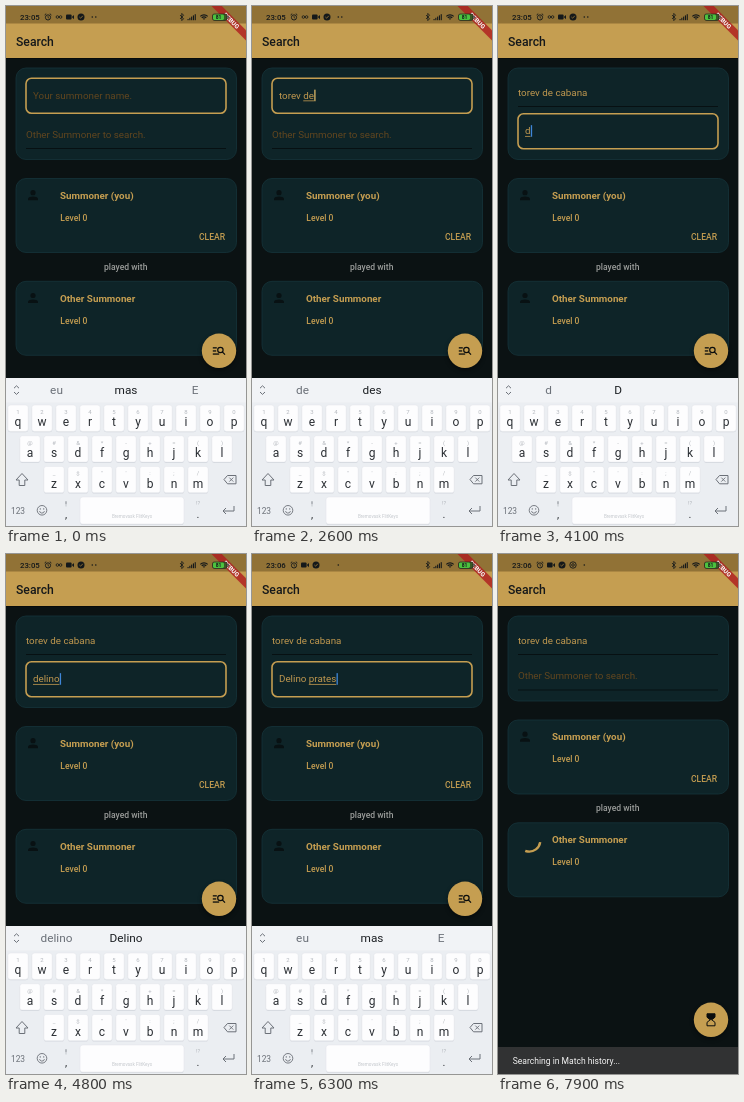
An HTML page with a canvas that plays this animation: 240 px wide and 520 px high, repeating every 8 s.

```html
<!DOCTYPE html>
<html lang="en">
<head>
<meta charset="utf-8">
<title>Summoner search</title>
<style>
html, body { margin: 0; width: 240px; height: 520px; overflow: hidden; background: #0b1213; }
canvas { display: block; width: 240px; height: 520px; }
</style>
</head>
<body>
<canvas id="stage"></canvas>
<script>
const LOOP = 8000, W = 240, H = 520;
const GOLD = '#c59e51', INK = '#14181a', CARD = '#0e2428';
const canvas = document.getElementById('stage');
const g = canvas.getContext('2d');
const dpr = window.devicePixelRatio || 1;
canvas.width = W * dpr;
canvas.height = H * dpr;

const clamp = v => Math.max(0, Math.min(1, v));
const ramp = (t, a, b) => clamp((t - a) / (b - a));
const mix = (a, b, k) => a + (b - a) * k;
const ease = x => x * x * (3 - 2 * x);
const typed = (s, t, from, step) => s.slice(0, Math.max(0, Math.floor((t - from) / step)));

// cubic-bezier(.4, 0, .2, 1), solved by bisection
function fastOutSlowIn(x) {
  let lo = 0, hi = 1, s = 0.5;
  for (let i = 0; i < 18; i++) {
    s = (lo + hi) / 2;
    const v = 1.2 * s * (1 - s) * (1 - s) + 0.6 * s * s * (1 - s) + s * s * s;
    if (v < x) lo = s; else hi = s;
  }
  return 3 * s * s * (1 - s) + s * s * s;
}

function text(s, x, y, size, color, weight = 400, align = 'left') {
  g.font = `${weight} ${size}px Roboto, sans-serif`;
  g.textAlign = align;
  g.textBaseline = 'alphabetic';
  g.fillStyle = color;
  g.fillText(s, x, y + size * 0.355);
  return g.measureText(s).width;
}

function rect(x, y, w, h, color) {
  g.fillStyle = color;
  g.fillRect(x, y, w, h);
}

function box(x, y, w, h, r, fill, stroke, lw = 1) {
  g.beginPath();
  g.roundRect(x, y, w, h, r);
  if (fill) { g.fillStyle = fill; g.fill(); }
  if (stroke) { g.strokeStyle = stroke; g.lineWidth = lw; g.stroke(); }
}

function disc(x, y, r, color) {
  g.beginPath();
  g.arc(x, y, r, 0, 7);
  g.fillStyle = color;
  g.fill();
}

function ring(x, y, r, color, lw) {
  g.beginPath();
  g.arc(x, y, r, 0, 7);
  g.strokeStyle = color;
  g.lineWidth = lw;
  g.stroke();
}

// points: x, y pairs
function line(points, color, lw, fill, close) {
  g.beginPath();
  for (let i = 0; i < points.length; i += 2) g.lineTo(points[i], points[i + 1]);
  if (close) g.closePath();
  if (fill) { g.fillStyle = fill; g.fill(); }
  if (color) { g.strokeStyle = color; g.lineWidth = lw; g.stroke(); }
}

function alarm(x) {
  ring(x, 11.4, 2.6, INK, 0.9);
  line([x, 9.8, x, 11.6, x + 1.2, 12.2], INK, 0.7);
  line([x - 3.4, 9, x - 1.8, 7.7], INK, 0.9);
  line([x + 3.4, 9, x + 1.8, 7.7], INK, 0.9);
}

function glasses(x) {
  ring(x - 1.6, 11, 1.3, INK, 0.8);
  ring(x + 1.6, 11, 1.3, INK, 0.8);
}

function camera(x) {
  box(x - 4, 8.6, 5.6, 5, 1, INK);
  line([x + 1.8, 11, x + 4, 9, x + 4, 13.2], null, 0, INK, true);
}

function tick(x) {
  disc(x, 11, 3.5, INK);
  line([x - 1.6, 11, x - 0.4, 12.2, x + 1.8, 9.8], '#917236', 0.9);
}

function statusBar(t) {
  const late = t >= 5500;
  text(late ? '23:06' : '23:05', 14, 11.2, 7.8, INK, 500);
  alarm(42);
  if (late) {
    camera(53);
    tick(64);
    if (t >= 6650) {
      ring(75, 11, 3.2, INK, 0.9);
      ring(75, 11, 1.3, INK, 0.9);
    }
    disc(86.3, 11, 0.8, INK);
  } else {
    glasses(53);
    camera(64);
    tick(75);
    disc(86.3, 11, 0.8, INK);
    disc(89.8, 11, 0.8, INK);
  }
  line([174, 9, 177.6, 12.8, 175.8, 14.6, 175.8, 7.4, 177.6, 9.2, 174, 13], INK, 0.8);
  for (let i = 0; i < 5; i++) rect(181.5 + i * 1.8, 13 - i * 1.2, 1.1, 1.2 + i * 1.2, INK);
  g.lineCap = 'butt';
  for (let i = 0; i < 3; i++) {
    g.beginPath();
    g.arc(198, 14, 1.2 + i * 2, -Math.PI * 0.75, -Math.PI * 0.25);
    g.strokeStyle = INK;
    g.lineWidth = 1.2;
    g.stroke();
  }
  box(206.5, 8, 14.5, 6.4, 1.8, '#3a5a25', INK, 0.6);
  box(207, 8.5, 11, 5.4, 1.4, '#4cc23f');
  text('81', 212.5, 11.3, 5, INK, 700, 'center');
  rect(221.6, 10, 1, 2.4, INK);
}

function banner() {
  g.save();
  g.translate(W, 0);
  g.rotate(Math.PI / 4);
  rect(-36, 17.1, 72, 7.3, 'rgba(176,28,30,.8)');
  text('DEBUG', 0, 20.8, 6.2, '#f4eeee', 900, 'center');
  g.restore();
}

function person(x, y) {
  disc(x, y - 2.6, 2.6, '#081113');
  g.beginPath();
  g.moveTo(x - 5, y + 5);
  g.lineTo(x - 5, y + 3.4);
  g.bezierCurveTo(x - 4.6, y + 0.6, x + 4.6, y + 0.6, x + 5, y + 3.4);
  g.lineTo(x + 5, y + 5);
  g.fill();
}

function spinner(x, y, t) {
  const u = 1420 + (t - 6800) * 1.98;
  const phase = (u / 1333) % 1;
  const head = fastOutSlowIn(clamp(phase * 2));
  const tail = fastOutSlowIn(clamp(phase * 2 - 1));
  const from = Math.PI * (-0.47 + 1.5 * tail + 2 * u / 2222 + 0.5 * phase);
  g.beginPath();
  g.arc(x, y, 11, from, from + Math.max(0.02, 1.5 * Math.PI * (head - tail)));
  g.strokeStyle = GOLD;
  g.lineWidth = 2.4;
  g.stroke();
}

// focus runs from a plain underlined field (0) to an outlined one (1)
function field(y, focus, value, hint, mark, caret) {
  const h = 29 + 6.5 * focus, mid = y + h / 2 - 0.3;
  const x = mix(20, 27, focus);
  if (focus < 1) rect(20, y + h - 1, 200, 1, `rgba(7,16,18,${1 - focus})`);
  if (focus > 0) {
    g.globalAlpha = focus;
    box(20, y + 0.3, 200, h - 0.6, 5.5, null, GOLD, 1.6);
    g.globalAlpha = 1;
  }
  if (!value) {
    text(hint, x, mid, 9.8, '#61461f');
    return;
  }
  const w = text(value, x, mid, 9.8, '#c0984f');
  if (focus < 1) return;
  if (mark) {
    const mw = g.measureText(mark).width;
    rect(x + w - mw, mid + 5, mw, 0.8, '#c0984f');
  }
  rect(x + w + 0.3, mid - 5.8, 1.3, 11.6, caret);
}

function profile(y, title, clear, busy, t) {
  box(10, y, 220.5, 74, 10, CARD, '#16343a', 0.8);
  if (busy) spinner(31.3, y + 17.8, t);
  else person(27, y + 16.8);
  text(title, 54, y + 17, 9.8, GOLD, 700);
  text('Level 0', 54.3, y + 39.2, 8.55, GOLD, 500);
  if (clear) text('CLEAR', 219, y + 58.8, 8.55, GOLD, 500, 'right');
}

function fab(y, busy) {
  const x = 213;
  g.save();
  g.shadowColor = 'rgba(0,0,0,.45)';
  g.shadowBlur = 4 * dpr;
  g.shadowOffsetY = 2 * dpr;
  disc(x, y, 17.2, GOLD);
  g.restore();
  if (busy) {
    line([x - 4, y - 6, x + 4, y - 6, x + 4, y - 2.6, x + 0.8, y, x + 4, y + 2.6, x + 4, y + 6,
      x - 4, y + 6, x - 4, y + 2.6, x - 0.8, y, x - 4, y - 2.6], '#0b0d0d', 1, null, true);
    line([x - 4, y - 6, x + 4, y - 6, x + 4, y - 2.6, x, y + 0.4, x - 4, y - 2.6], null, 0, '#0b0d0d', true);
  } else {
    rect(x - 6.2, y - 3.6, 4, 1.3, '#0b0d0d');
    rect(x - 6.2, y - 0.5, 3.4, 1.3, '#0b0d0d');
    rect(x - 6.2, y + 2.6, 6.4, 1.3, '#0b0d0d');
    ring(x + 1.4, y - 0.8, 2.7, '#0b0d0d', 1.2);
    line([x + 3.3, y + 1.1, x + 6, y + 3.8], '#0b0d0d', 1.3);
  }
}

const ROWS = [
  { keys: 'qwertyuiop', hints: '1234567890', x: 12, y: 399 },
  { keys: 'asdfghjkl', hints: '@#&*-+=()', x: 24, y: 429.7 },
  { keys: 'zxcvbnm', hints: '_$"\':;/', x: 48, y: 460.4 }
];

function key(x, y, w, h) {
  box(x, y + 0.8, w, h, 2.6, '#d3d7dd');
  box(x, y, w, h, 2.6, '#fdfdfe', '#e0e3e8', 0.5);
}

function keyboard(dy, words) {
  const dark = '#2b2f34', grey = '#6b7078', pale = '#b4b8be';
  g.save();
  g.translate(0, dy);
  rect(0, 372, W, 148, '#ebeef2');
  rect(0, 372, W, 24.5, '#f1f3f6');
  line([8, 382.2, 10.5, 379.8, 13, 382.2], grey, 1);
  line([8, 386, 10.5, 388.4, 13, 386], grey, 1);
  text(words[0], 50.5, 384.3, 11.8, grey, 400, 'center');
  text(words[1], 120, 384.3, 11.8, '#1d2024', 400, 'center');
  text(words[2], 189, 384.3, 11.8, grey, 400, 'center');
  for (const row of ROWS) {
    [...row.keys].forEach((c, i) => {
      const x = row.x + i * 24;
      key(x - 10.2, row.y, 20.4, 26.4);
      text(row.hints[i], x, row.y + 6.8, 6, pale, 400, 'center');
      text(c, x, row.y + 17, 12, dark, 400, 'center');
    });
  }
  line([16, 467.5, 22, 474, 18.8, 474, 18.8, 479.5, 13.2, 479.5, 13.2, 474, 10, 474], grey, 1, null, true);
  line([218, 473.5, 221.5, 469.5, 230, 469.5, 230, 477.8, 221.5, 477.8], grey, 1, null, true);
  line([223.3, 471.6, 227.3, 475.6], grey, 0.9);
  line([227.3, 471.6, 223.3, 475.6], grey, 0.9);
  text('123', 12, 504.8, 8.4, grey, 400, 'center');
  ring(36, 504.3, 4.8, grey, 0.9);
  disc(34.3, 502.9, 0.7, grey);
  disc(37.7, 502.9, 0.7, grey);
  g.beginPath();
  g.arc(36, 504.6, 2.5, 0.2, Math.PI - 0.2);
  g.strokeStyle = grey;
  g.lineWidth = 0.9;
  g.stroke();
  box(59, 495, 2, 3.6, 1, pale);
  line([60, 498.5, 60, 500.5], pale, 0.7);
  text(',', 60, 508.5, 11, dark, 400, 'center');
  key(74, 491, 104, 27);
  text('Bremovask FlitKeys', 126, 510, 4.6, '#c3c7cc', 400, 'center');
  text('!?', 192, 497.5, 5.5, pale, 400, 'center');
  text('.', 192, 508, 11, dark, 400, 'center');
  line([228, 500, 228, 505, 217, 505], grey, 1);
  line([220, 502, 217, 505, 220, 508], grey, 1);
  g.restore();
}

const NAME = 'torev de cabana';

function suggestions(t, first, second) {
  if (t < 3700) {
    const w = first.split(' ').pop();
    if (w === 'cabana') return ['cabanas', 'cabana', 'cabanha'];
    if (w) return [w, w + 's', ''];
  } else if (t < 6250) {
    const w = second.split(' ').pop();
    if (w) return [w, w[0].toUpperCase() + w.slice(1), ''];
  }
  return ['eu', 'mas', 'E'];
}

function draw(t) {
  const sent = t >= 6420;
  const first = typed(NAME, t, 1880, 86);
  let second = '';
  if (t < 5150) second = typed('delino', t, 3960, 115);
  else if (!sent) second = 'Delino ' + typed('prates', t, 5400, 115);

  const swap = ease(ramp(t, 3680, 3790));
  const leave = ease(ramp(t, 6420, 6530));
  const f1 = 1 - swap, f2 = swap * (1 - leave);
  const shift = 6.5 * (f1 + f2);
  const kb = 148 * ease(ramp(t, 6430, 6590));
  const snack = 27 * ease(ramp(t, 6560, 6700));

  g.setTransform(dpr, 0, 0, dpr, 0, 0);
  rect(0, 0, W, H, '#0b1213');

  box(10, 62, 220.5, 85 + shift, 10, CARD, '#16343a', 0.8);
  const y2 = 72 + 29 + 6.5 * f1 + 6.5;
  field(72, f1, first, 'Your summoner name.', first.split(' ').pop(), '#d9b466');
  field(y2, f2, second, 'Other Summoner to search.', second.split(' ').pop(), '#3f86d8');

  profile(166 + shift, 'Summoner (you)', true, false, t);
  text('played with', 119.7, 254 + shift, 8.55, '#9a9c9a', 500, 'center');
  profile(268.8 + shift, 'Other Summoner', false, sent, t);

  rect(0, 0, W, 52, GOLD);
  rect(0, 0, W, 17.5, '#917236');
  rect(0, 52, W, 1, 'rgba(0,0,0,.4)');
  text('Search', 10, 35.2, 12.2, '#15181a', 500);
  banner();
  statusBar(t);

  fab(Math.min(372 + kb, H - snack) - 27.2, sent);
  if (snack > 0) {
    rect(0, H - snack, W, 27, '#313233');
    text('Searching in Match history...', 14.7, H - snack + 13.8, 8.55, '#f2f2f2');
  }
  if (kb < 148) keyboard(kb, suggestions(t, first, second));
}

function frame() {
  draw(performance.now() % LOOP);
  requestAnimationFrame(frame);
}
frame();
</script>
</body>
</html>
```
